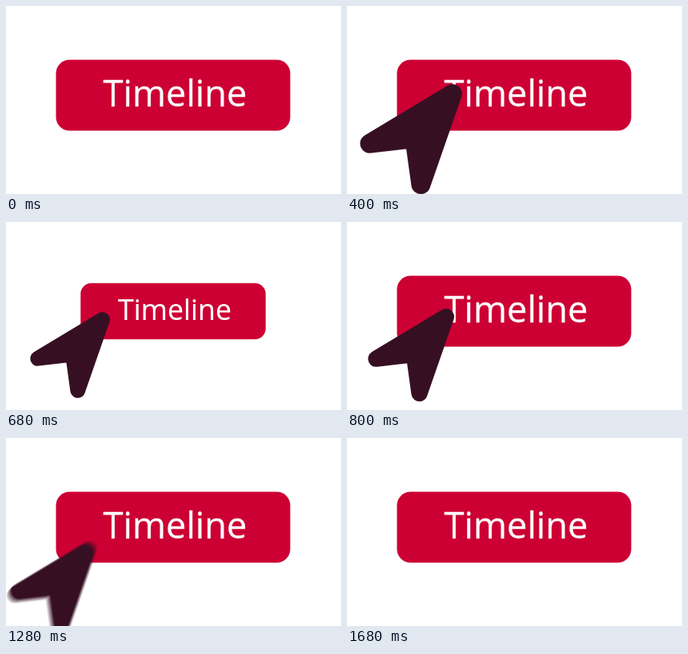
An HTML page for the animation above (2600 ms loop, 419 by 236 pixels).

```html
<!DOCTYPE html>
<html lang="en">
<head>
<meta charset="utf-8">
<title>Timeline button</title>
<style>
  html, body { margin: 0; width: 100%; height: 100%; overflow: hidden; background: #fff; }
  svg { display: block; width: 100%; height: 100%; }
  text { font: 45.2px "Open Sans", "Noto Sans", sans-serif; fill: #fff; stroke: #fff; stroke-width: .3px; text-anchor: middle; }
  #cursor { isolation: isolate; }
  #cursor path {
    fill: #330f22; stroke: #330f22; stroke-width: 24px; stroke-linejoin: round;
    opacity: .2; mix-blend-mode: plus-lighter;
  }
</style>
</head>
<body>
<svg viewBox="0 0 419 236">
  <g id="button">
    <rect x="62.5" y="67.5" width="293" height="89" rx="17" fill="#cc0033"/>
    <text x="211.5" y="126">Timeline</text>
  </g>
  <g id="cursor">
    <path d="M132 110 L28.5 172.5 L84.5 166 L92.5 224 Z"/>
  </g>
</svg>
<script>
  const LOOP = 2600, STEP = 40;
  const SHUTTER = 20, SAMPLES = 5; // motion blur: SAMPLES copies at opacity 1 / SAMPLES
  const button = document.getElementById('button');
  const cursor = document.getElementById('cursor');
  const shape = cursor.firstElementChild;
  for (let i = 1; i < SAMPLES; i++) cursor.append(shape.cloneNode());

  const progress = (t, from, to) => Math.min(1, Math.max(0, (t - from) / (to - from)));
  const easeOut = p => 1 - (1 - p) ** 1.65;
  const easeInOut = p => p < .5 ? 2 * p * p : 1 - 2 * (1 - p) ** 2;
  const mix = (a, b, p) => a + (b - a) * p;

  // Press to the smallest size, then release to the given size.
  function pressScale(t, smallest, released) {
    return t < 680
      ? mix(1, smallest, easeInOut(progress(t, 560, 680)))
      : mix(smallest, released, easeInOut(progress(t, 680, 800)));
  }

  function place(el, cx, cy, scale, dx = 0, dy = 0) {
    el.setAttribute('transform',
      `translate(${cx + dx} ${cy + dy}) scale(${scale}) translate(${-cx} ${-cy})`);
  }

  function placeCursor(el, t) {
    const away = 1 - easeOut(progress(t, 40, 400));
    const leave = easeInOut(progress(t, 1120, 1680));
    place(el, 80, 167, pressScale(t, .78, .845),
      -145 * away - 138 * leave, 172 * away + 140 * leave);
  }

  function draw(t) {
    place(button, 209.2, 112, pressScale(t, .79, 1));
    [...cursor.children].forEach((el, i) =>
      placeCursor(el, t + SHUTTER * (i / (SAMPLES - 1) - .5)));
    cursor.style.visibility = t < 80 || t >= 1680 ? 'hidden' : 'visible';
  }

  const start = performance.now();
  function tick() {
    const t = (performance.now() - start) % LOOP;
    draw(Math.floor(t / STEP) * STEP);
    requestAnimationFrame(tick);
  }
  tick();
</script>
</body>
</html>
```
